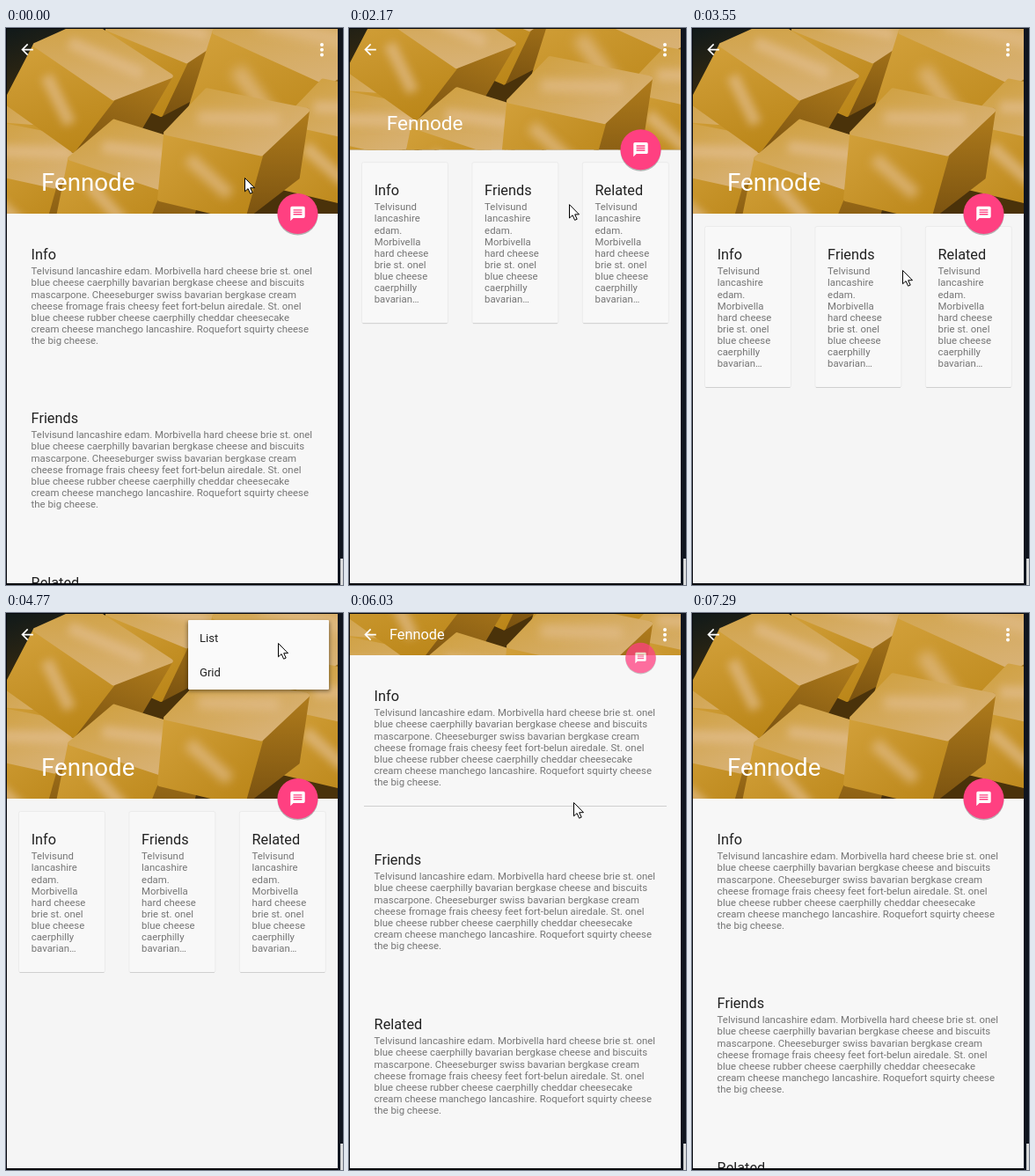
These frames come from a looping animation (383 px wide and 633 px high, 7680 ms). An HTML page:

```html
<!DOCTYPE html>
<html lang="en">
<head>
<meta charset="utf-8">
<title>Collapsing toolbar</title>
<style>
html, body { margin: 0; width: 100%; height: 100%; overflow: hidden; background: #05070d; }
svg { display: block; width: 383px; height: 633px; font-family: Roboto, sans-serif; }
.head { font-size: 16.3px; fill: #212121; }
.body { font-size: 11.4px; fill: #757575; }
.item { font-size: 13.1px; fill: #222; }
</style>
</head>
<body>
<svg viewBox="0 0 383 633">
  <defs>
    <clipPath id="screen"><path d="M1 1h376v630H1z"/></clipPath>
    <clipPath id="heroClip"><rect id="heroBox" x="1" y="1" width="376" height="210"/></clipPath>
    <linearGradient id="back" x2=".7" y2="1"><stop stop-color="#10191a"/><stop offset=".4" stop-color="#4a320a"/></linearGradient>
    <linearGradient id="lit" x2="1" y2="1"><stop stop-color="#cf9f3c"/><stop offset="1" stop-color="#dab580"/></linearGradient>
    <linearGradient id="mid" x2="1" y2="1"><stop stop-color="#d2a03a"/><stop offset="1" stop-color="#b98416"/></linearGradient>
    <linearGradient id="low" x2="0" y2="1"><stop stop-color="#b07c1c"/><stop offset="1" stop-color="#7a5210"/></linearGradient>
    <filter id="soft"><feGaussianBlur stdDeviation="2"/></filter>
    <filter id="blot" x="-50%" y="-50%" width="200%" height="200%"><feGaussianBlur stdDeviation="5"/></filter>
    <g id="cube" stroke-width="5" stroke-linejoin="round">
      <path d="M0 0L51-48 40 26-20 72z" fill="url(#low)" stroke="url(#low)"/>
      <path d="M0 0L-105-23-112 50-20 72z" fill="url(#mid)" stroke="url(#mid)"/>
      <path d="M0 0L-105-23-60-70 51-48z" fill="url(#lit)" stroke="url(#lit)"/>
      <path d="M-70-40L20-38M-80 5L-35 45" stroke="#e2bd8c" stroke-width="14" opacity=".7" filter="url(#blot)"/>
    </g>
  </defs>

  <path d="M377 0h6v633h-6z" fill="#10151f"/>
  <path d="M380 603h3v30h-3z" fill="#d8d9da"/>

  <g clip-path="url(#screen)">
    <rect id="page" width="383" height="633"/>
    <g id="list"></g>
    <g id="grid"></g>

    <g clip-path="url(#heroClip)">
      <g id="photo"><path d="M0 0h383v211H0z" fill="url(#back)"/></g>
      <rect id="scrim" width="383" height="211" fill="#5f35a0"/>
    </g>

    <text id="title" fill="#fff" font-size="27.7">Fennode</text>
    <path transform="translate(14 14.5) scale(.84)" fill="#fff" d="M20 11H7.8l5.6-5.6L12 4l-8 8 8 8 1.4-1.4L7.8 13H20z"/>
    <path d="M359 19v12" stroke="#fff" stroke-width="4" stroke-linecap="round" stroke-dasharray="0 5.7"/>

    <g id="fab">
      <circle cy="1.5" r="23" opacity=".28"/>
      <circle r="23" fill="#ff4081"/>
      <g transform="scale(.82) translate(-12 -12)">
        <path fill="#fff" d="M20 2H4a2 2 0 0 0-2 2v18l4-4h14a2 2 0 0 0 2-2V4a2 2 0 0 0-2-2z"/>
        <path stroke="#ff4081" stroke-width="1.7" d="M6 7h12M6 10h12M6 13h12"/>
      </g>
    </g>

    <g id="menu">
      <path d="M206 10h162v79H206z" opacity=".4" filter="url(#soft)"/>
      <rect x="207" y="8" width="160" height="79" rx="1" fill="#fafafa"/>
      <rect id="press" x="207" width="160" height="39" fill="#e6e6e6"/>
      <text class="item" x="220" y="33">List</text>
      <text class="item" x="220" y="72">Grid</text>
    </g>
    <path id="cursor" fill="#fff" stroke="#000" d="M.5.5v15.3l3.6-3.2 2.5 5.6 2.6-1.1-2.5-5.4h4.8z"/>
  </g>
</svg>

<script>
const LOOP = 7680, VISIT = 3560, STEP = 130, RANGE = 163;
const $ = id => document.getElementById(id);
const set = (id, attrs) => { for (const k in attrs) $(id).setAttribute(k, attrs[k]); };

const heads = ['Info', 'Friends', 'Related'];
const wide = [
  'Telvisund lancashire edam. Morbivella hard cheese brie st. onel',
  'blue cheese caerphilly bavarian bergkase cheese and biscuits',
  'mascarpone. Cheeseburger swiss bavarian bergkase cream',
  'cheese fromage frais cheesy feet fort-belun airedale. St. onel',
  'blue cheese rubber cheese caerphilly cheddar cheesecake',
  'cream cheese manchego lancashire. Roquefort squirty cheese',
  'the big cheese.'];
const narrow = ['Telvisund', 'lancashire', 'edam.', 'Morbivella', 'hard cheese',
  'brie st. onel', 'blue cheese', 'caerphilly', 'bavarian…'];

const block = (head, lines, x, y) =>
  `<text class="head" x="${x}" y="${y}">${head}</text>` +
  lines.map((s, i) => `<text class="body" x="${x}" y="${Math.round(y + 17.3 + i * 13.1)}">${s}</text>`).join('');

$('list').innerHTML = heads.map((h, i) => block(h, wide, 28.6, Math.round(263 + i * 186.4))).join('') +
  '<path id="rule" d="M17 382.5H361" stroke="#cfcfcf"/>';
$('grid').innerHTML = heads.map((h, i) => {
  const x = 14.5 + i * 125.4;
  return `<rect x="${x}" y="225.5" width="98" height="183" rx="2" fill="#f8f8f8" stroke="#ebebeb"/>` +
    `<path d="M${x + 1} 408.5h96" stroke="#d0d0d0"/>` + block(h, narrow, x + 14.2, 263);
}).join('');

// Cheese cubes from back to front: x, y, scale, tilt
const cubes = [[205, 38, .9, 10], [365, 62, 1.3, 12], [85, 112, .9, -8], [55, 180, 1, 0],
  [122, 80, 1, 22], [175, 182, 1, 6], [420, 130, 1, 0], [290, 143, 1.03, 0]];
$('photo').innerHTML += cubes.map(([x, y, k, a]) =>
  `<use href="#cube" transform="translate(${x} ${y}) rotate(${a}) scale(${k})"/>`).join('');

// Each visit picks a layout, then drags the page up and down
const dots = [355, 18];
const visits = [
  { start: [271, 170], pick: [319, 64], grab: [250, 273], leave: [239, 275] },
  { start: [239, 275], pick: [309, 34], grab: [255, 378], leave: [326, 611] }];
const bursts = [[0, 1], [120, 4], [810, 4], [1510, 8], [2560, 8]];   // start, steps

const ramp = (t, a, b) => Math.min(1, Math.max(0, (t - a) / (b - a)));
const mix = (p, q, f) => p.map((v, i) => v + (q[i] - v) * f);

function hold(t) {
  const [start, n] = bursts.filter(b => b[0] <= t).pop();
  return start + STEP * Math.min(n - 1, Math.floor((t - start) / STEP));
}

function draw(now) {
  const second = now >= VISIT, local = second ? now - VISIT : now;
  const t = hold(local), picked = t >= 1510, grid = picked !== second;
  const { start, pick, grab, leave } = visits[+second];

  const p = ramp(t, 1950, 2420) - ramp(t, 2690, 3350), scroll = RANGE * p;
  const menu = ramp(t, 700, 940) - ramp(t, 1600, 1850);
  const fab = 1 - ramp(t, 2360, 2600) + ramp(t, 2950, 3150);
  const scrim = ramp(t, 2480, 2690) - ramp(t, 2950, 3250);

  let spot = mix(start, dots, ramp(t, 0, 510));
  spot = mix(spot, pick, ramp(t, 810, 1200));
  spot = mix(spot, grab, ramp(t, 1600, 1950));
  spot = mix(spot, leave, ramp(t, 3200, 3470));

  const shift = `translate(0 ${-scroll})`;
  set('page', { fill: grid ? '#f5f5f5' : '#f7f7f7' });
  set('list', { display: grid ? 'none' : 'inline', transform: shift });
  set('grid', { display: grid ? 'inline' : 'none', transform: shift });
  set('rule', { opacity: p > 0 ? 1 : 0 });

  set('heroBox', { height: 210 - scroll });
  set('photo', { transform: `translate(0 ${-scroll / 2})` });
  set('scrim', { opacity: .87 * scrim });
  set('title', { transform: `translate(${40 + 6 * p} ${185 - 154.7 * p}) scale(${1 - .411 * p})` });
  set('fab', { opacity: fab, transform: `translate(331.5 ${Math.max(51, 211 - scroll)}) scale(${fab})` });

  set('menu', { opacity: menu, transform: `translate(367 8) scale(${.5 + menu / 2}) translate(-367 -8)` });
  set('press', { y: grid ? 48 : 8, opacity: picked ? 1 : 0 });
  set('cursor', { transform: `translate(${spot[0]} ${spot[1] - scroll})`, opacity: second && local > 3700 ? 0 : 1 });
}

const began = performance.now();
function tick() {
  draw((performance.now() - began) % LOOP);
  requestAnimationFrame(tick);
}
tick();
</script>
</body>
</html>
```
